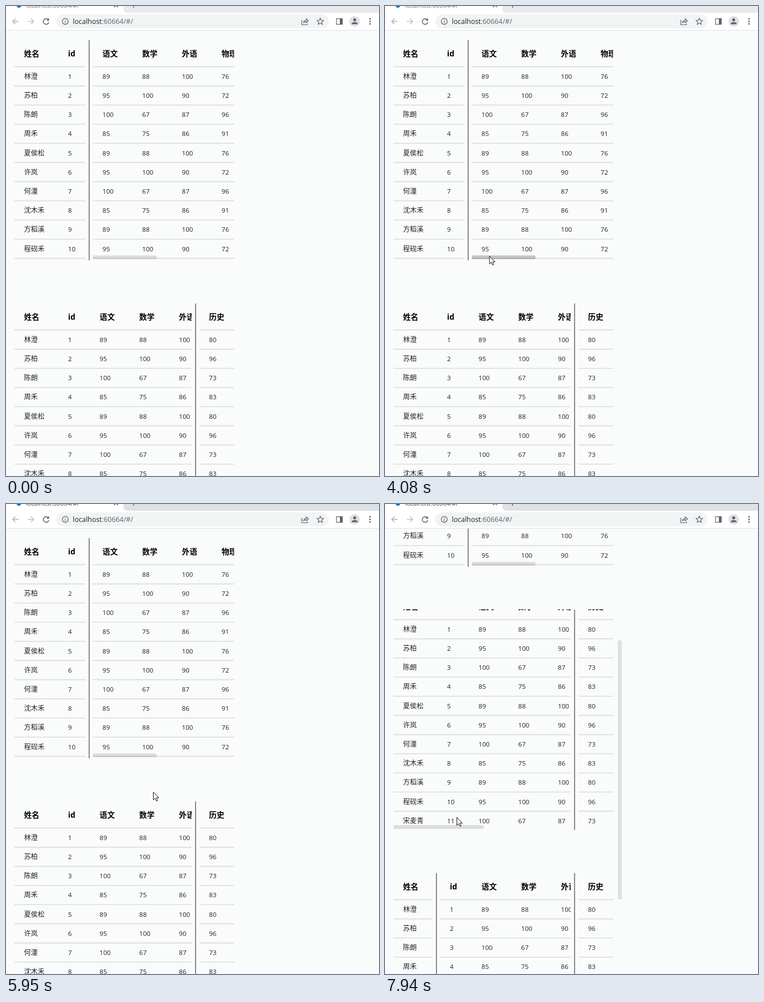
Write an HTML page that moves like this. It is 667 by 839 pixels and loops after 8000 ms.

```html
<!DOCTYPE html>
<html lang="zh">
<head>
<meta charset="utf-8">
<title>Fixed columns</title>
<style>
html, body { margin: 0; width: 100%; height: 100%; overflow: hidden; background: #fafbfb; }
#stage { display: block; width: 667px; height: 839px; }
text { font: 11.6px "Open Sans", "Noto Sans CJK SC", "Noto Sans CJK", sans-serif; fill: #212121; }
.name { font-size: 12.2px; }
.head { font-size: 13.7px; font-weight: 700; fill: #000; }
.line { stroke: #dcdcdc; stroke-width: 1.6; }
.icon { fill: none; stroke: #5f6368; stroke-width: 1.5; }
.solid { fill: #5f6368; }
</style>
</head>
<body>
<svg id="stage" viewBox="0 0 667 839">
  <rect width="667" height="839" fill="#fafbfb"/>
  <svg y="44" width="667" height="795" viewBox="0 44 667 795">
    <g id="page"></g>
    <rect id="vbar" x="416.5" y="44" width="7" height="463" rx="3.5"/>
  </svg>
  <g id="chrome">
    <rect id="strip" width="667" height="13"/>
    <path d="M0 0H210V5Q210 12 217 12H667V43H0Z" fill="#fff"/>
    <path d="M0 43.5H667" stroke="#dfe1e4"/>
    <circle cx="23" cy="-1" r="4" fill="#2b6cb0"/>
    <text id="tab" x="36" y="2.6" style="font-size:10.9px">localhost:60664/#/</text>
    <path class="icon" d="M193-5L200 2M200-5L193 2M228-4V3" stroke-width="1.2"/>
    <g class="icon">
      <path d="M22.5 27.5H12M17 22.5L12 27.5L17 32.5" stroke="#aeb1b5"/>
      <path d="M39 27.5H49.5M44.5 22.5L49.5 27.5L44.5 32.5" stroke="#bdc0c3"/>
      <path d="M75.5 24.5A5 5 0 1 0 76.5 29"/>
      <path d="M77 21.5V26.3H72.2Z" fill="#5f6368" stroke="none"/>
    </g>
    <rect x="90" y="15" width="487" height="25" rx="12.5" fill="#f1f3f4"/>
    <g class="icon" style="stroke-width:1.2">
      <circle cx="106" cy="27.5" r="5.3"/>
      <path d="M106 26.7V30.5M106 24.3V25.6"/>
      <path d="M530 25.5H529V33.5H539V31.5M532 30.5Q532.5 25.5 537 25.5V23L541 26.5L537 30V27.7Q534 27.5 532 30.5Z"/>
      <path d="M562 21.7L563.7 25.5L567.8 25.9L564.7 28.6L565.6 32.7L562 30.6L558.4 32.7L559.3 28.6L556.2 25.9L560.3 25.5Z"/>
      <rect x="591" y="22.7" width="10" height="10"/>
    </g>
    <rect class="solid" x="597" y="22" width="5" height="11"/>
    <text x="119.5" y="31.8" style="font-size:12.4px">localhost<tspan fill="#5f6368">:60664/#/</tspan></text>
    <circle cx="623.5" cy="27.5" r="9.5" fill="#dee1e6"/>
    <circle class="solid" cx="623.5" cy="24.7" r="2.6"/>
    <path class="solid" d="M618 32.5Q618 28.8 623.5 28.8T629 32.5Z"/>
    <path class="icon" d="M651 23V32.1" style="stroke-width:2.8;stroke-linecap:round;stroke-dasharray:0 4.5"/>
  </g>
  <circle id="press" r="10.5" fill="#f6e500" fill-opacity=".62"/>
  <path id="cursor" d="M.5 .5V14.5L3.7 11.6L5.9 16.5L8.2 15.5L6 10.7H10.3Z" fill="#fff" stroke="#111"/>
</svg>
<script>
const $ = id => document.getElementById(id);
const LOOP = 8000, ROW = 34.2, HEAD = 47.4, COL = 71, TABLE = 393, GAP = 470;

const people = '林澄 苏柏 陈朗 周禾 夏侯松 许岚 何潼 沈木禾 方稻溪 程砚禾 宋麦青'.split(' ');
const names = '语文 数学 外语 物理 化学 生物 地理 历史'.split(' ');
const marks = {
  语文: [89, 95, 100, 85], 数学: [88, 100, 67, 75], 外语: [100, 90, 87, 86],
  物理: [76, 72, 96, 91], 化学: [81, 65, 89, 100], 历史: [80, 96, 73, 83]
};

// The marks repeat every four rows
function cell(title, row) {
  if (title === '姓名') return people[row];
  if (title === 'id') return row + 1;
  return marks[title] ? marks[title][row % 4] : 70 + row % 4 * 7;
}

// One clipped part of a table; cols are [title, x] pairs
function pane(x, width, cols, rows, id = '') {
  let out = '';
  for (const [title, cx] of cols) {
    const kind = title === '姓名' ? 'name' : '';
    out += `<text class="head" x="${cx}" y="28.9">${title}</text>`;
    for (let r = 0; r < rows; r++)
      out += `<text class="${kind}" x="${cx}" y="${HEAD + ROW * r + 21.4}">${cell(title, r)}</text>`;
  }
  for (let r = 0; r <= rows; r++) out += `<path class="line" d="M0 ${HEAD + ROW * r}H900"/>`;
  return `<svg x="${x}" y="-1" width="${width}" height="392" viewBox="${x} -1 ${width} 392"><g class="${id}">${out}</g></svg>`;
}

const scores = (x, count) => names.slice(0, count).map((n, i) => [n, x + i * COL]);
const rule = x => `<path d="M${x} 0V${TABLE}" stroke="#6c6c6c" stroke-width="1.6"/>`;
const hbar = (x, width, id) =>
  `<rect id="${id}" x="${x}" y="384.3" width="${width}" height="6.8" rx="3.4" fill-opacity=".12"/>`;
const table = (i, ...parts) => `<g transform="translate(0 ${61 + GAP * i})">${parts.join('')}</g>`;
const who = ['姓名', 32.3], last = [['历史', 363]];

$('page').innerHTML =
  table(0, pane(15, 127, [who, ['id', 111]], 10), rule(148.7),
    pane(155, 253, scores(172.5, 8), 10, 'across'), hbar(155, 114.5, 'thumb')) +
  table(1, pane(15, 317, [who, ['id', 111], ...scores(167.3, 7)], 11, 'down'), rule(339),
    pane(346, 62, last, 11, 'down'), hbar(15, 162, 'wide')) +
  table(2, pane(15, 70, [who], 10), rule(92),
    pane(99, 233, [['id', 116], ...scores(172.5, 7)], 10), rule(339),
    pane(346, 62, last, 10));

const across = document.querySelector('.across');
const downs = document.querySelectorAll('.down');

const ramp = (t, from, length) => Math.min(1, Math.max(0, (t - from) / length));
const easeOut = p => 1 - (1 - p) ** 3;
const within = (t, from, to) => t >= from && t < to;

// Pointer moves: start, end, x, y
const GRAB = 218;
const moves = [
  [160, 620, 641, 538], [820, 1350, 275, 317], [1500, 1830, 229, 274], [2030, 2350, 244, 246],
  [3490, 4080, 186, 446], [4080, 4290, GRAB, 448], [4360, 4880, 344, 448], [5100, 5600, GRAB, 448],
  [5740, 6090, 266, 518], [6600, 6820, 468, 505], [6820, 7140, 300, 545], [7200, 7940, 128, 559]
];

function pointer(t) {
  let x = 643, y = 839;
  for (const [from, to, tx, ty] of moves) {
    const p = easeOut(ramp(t, from, to - from));
    x += (tx - x) * p;
    y += (ty - y) * p;
  }
  return [x, y];
}

// Each wheel notch scrolls the page by 2.5 rows
const notch = (t, from) => 2.5 * ROW * ramp(t, from, 130);

function pageScroll(t) {
  if (t < 2950) return notch(t, 2550);
  return notch(t, 6350) + [0, 1, 2].reduce((sum, i) => sum + notch(t, 7200 + 220 * i), 0);
}

function barFade(t) {
  const hint = ramp(t, 1990, 130) * (1 - ramp(t, 2220, 130));
  return .11 * (hint + within(t, 2880, 2950) + ramp(t, 6350, 130));
}

const move = (el, x, y) => el.setAttribute('transform', `translate(${x} ${y})`);
const show = (el, on) => el.setAttribute('visibility', on ? 'visible' : 'hidden');

function draw(t) {
  const [x, y] = pointer(t);
  const scroll = pageScroll(t);
  const pressed = within(t, 4360, 5740), hover = within(t, 4020, 5810);
  const drag = pressed ? x - GRAB : 0;
  const active = t >= 4360;

  move($('cursor'), x, y);
  show($('cursor'), t >= 160);
  move($('press'), x - 1, y - 1);
  show($('press'), pressed);

  move($('page'), 0, -scroll);
  move($('vbar'), 0, scroll * .582);
  $('vbar').setAttribute('fill-opacity', barFade(t));

  move($('thumb'), drag, 0);
  $('thumb').setAttribute('fill-opacity', pressed ? .62 : hover ? .22 : .12);
  move(across, -drag * 2.18, 0);
  downs.forEach(el => move(el, 0, -30 * ramp(t, 6480, 70)));

  $('strip').setAttribute('fill', active ? '#dee1e6' : '#e7eaed');
  $('tab').style.fill = active ? '#45494d' : '#6b6f74';
}

const start = performance.now();
function tick() {
  draw((performance.now() - start) % LOOP);
  requestAnimationFrame(tick);
}
tick();
</script>
</body>
</html>
```
